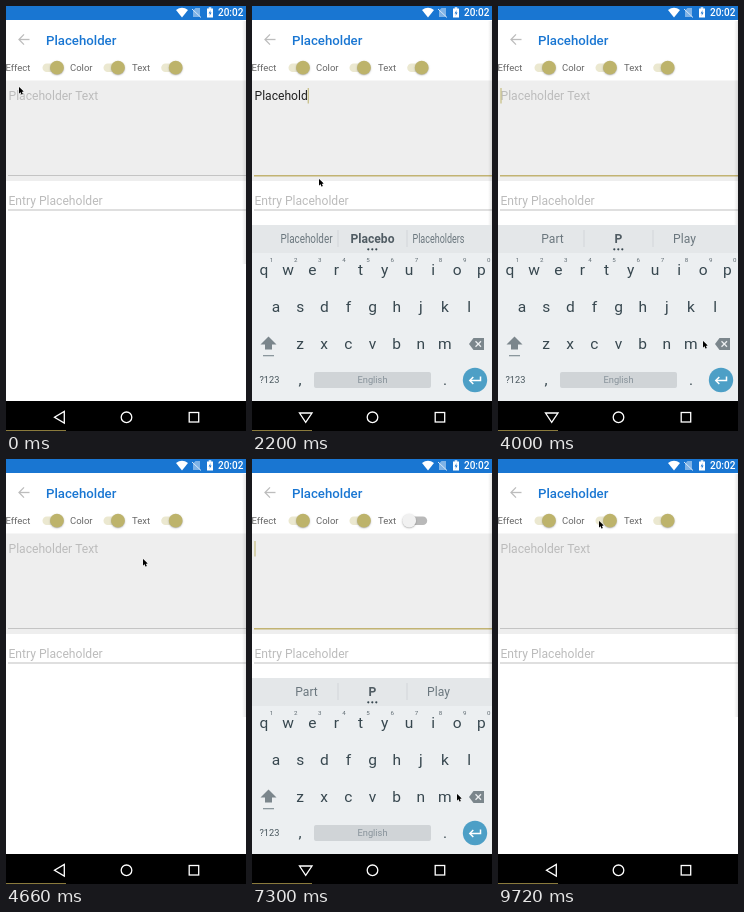
Recreate the animation shown at these times as an HTML page with a canvas. Size 240 by 425 pixels, loop 9.74 s.

```html
<!DOCTYPE html>
<html lang="en">
<head>
<meta charset="utf-8">
<title>Placeholder demo</title>
<style>
html, body { margin: 0; width: 100%; height: 100%; overflow: hidden; background: #fff; }
canvas { display: block; width: 240px; height: 425px; }
</style>
</head>
<body>
<canvas id="stage"></canvas>
<script>
const LOOP = 9740, W = 240, H = 425;
const canvas = document.getElementById('stage');
const ctx = canvas.getContext('2d');
const dpr = window.devicePixelRatio || 1;
canvas.width = W * dpr;
canvas.height = H * dpr;

const BLUE = '#1976d2', KHAKI = '#bdb36b', HINT = '#bcbcbc', HINT_DARK = '#808080';
const WORD = 'Placeholder';

// Typing sessions: letters appear one by one, then get deleted one by one.
const sessions = [
  { open: 480, close: 4380, type: 1200, length: 11, erase: 3250 },
  { open: 5430, close: 8000, type: 5900, length: 6, erase: 7000, underline: true }
];
const TYPE_STEP = 115, ERASE_STEP = 60;

// Pointer path: time, x, y of the tip.
const path = [
  [0, 13, 81], [160, 13, 81], [400, 62, 112], [700, 62, 112], [1000, 67, 173],
  [2800, 67, 173], [3180, 205, 335], [4080, 205, 335], [4360, 180, 215],
  [4660, 137, 100], [4920, 160, 62], [5120, 160, 62], [5380, 66, 91],
  [6550, 66, 91], [6920, 205, 335], [7450, 205, 335], [7940, 154, 62],
  [8550, 154, 62], [8850, 101, 62], [9740, 101, 62]
];

const clamp = v => Math.max(0, Math.min(1, v));
const smooth = v => { v = clamp(v); return v * v * (3 - 2 * v); };
const ramp = (t, start, duration) => smooth((t - start) / duration);

function rect(x, y, w, h, color) {
  ctx.fillStyle = color;
  ctx.fillRect(x, y, w, h);
}

function round(x, y, w, h, r, color) {
  ctx.fillStyle = color;
  ctx.beginPath();
  ctx.roundRect(x, y, w, h, r);
  ctx.fill();
}

function disc(x, y, r, color) {
  ctx.fillStyle = color;
  ctx.beginPath();
  ctx.arc(x, y, r, 0, Math.PI * 2);
  ctx.fill();
}

function poly(points, { fill, stroke, width = 1, closed = true }) {
  ctx.beginPath();
  points.forEach(([x, y]) => ctx.lineTo(x, y));
  if (closed) ctx.closePath();
  if (fill) { ctx.fillStyle = fill; ctx.fill(); }
  if (stroke) { ctx.strokeStyle = stroke; ctx.lineWidth = width; ctx.stroke(); }
}

function text(str, x, y, size, color, { weight = 400, align = 'left', max } = {}) {
  ctx.font = `${weight} ${size}px Roboto, sans-serif`;
  ctx.textAlign = align;
  ctx.fillStyle = color;
  ctx.fillText(str, x, y, max);
}

function typedCount(t, s) {
  if (t < s.type) return 0;
  const added = Math.min(s.length, Math.floor((t - s.type) / TYPE_STEP) + 1);
  const removed = t < s.erase ? 0 : Math.floor((t - s.erase) / ERASE_STEP) + 1;
  return Math.max(0, added - removed);
}

function suggestions(n, erasing) {
  if (n === 0 || (n === 1 && erasing)) return ['Part', 'P', 'Play'];
  if (n === 1) return ['Play', 'Part', 'Post'];
  if (n < 4) return ['Play', 'Place', 'Please'];
  if (n < 6) return ['Places', 'Place', 'Placed'];
  return ['Placeholder', n < 11 ? 'Placebo' : 'Placeholder', 'Placeholders'];
}

function statusBar() {
  rect(0, 0, W, 14, BLUE);
  ctx.fillStyle = '#fff';
  ctx.beginPath();
  ctx.moveTo(176, 11.5);
  ctx.lineTo(170, 4);
  ctx.quadraticCurveTo(176, -0.5, 182, 4);
  ctx.fill();
  poly([[187, 4.5], [189.5, 2], [194, 2], [194, 11], [187, 11]], { fill: '#7fb3e6' });
  poly([[186, 3], [195, 11.5]], { stroke: '#d6e7f8', closed: false });
  rect(201, 2.5, 6, 9, '#fff');
  rect(202.7, 1.3, 2.6, 1.5, '#fff');
  poly([[204.6, 4], [202.6, 7.5], [204, 7.5], [203.5, 10], [205.6, 6.5], [204.2, 6.5]], { fill: BLUE });
  text('20:02', 212, 10.2, 10, '#fff', { weight: 500 });
}

function header() {
  poly([[23.5, 33.5], [13, 33.5]], { stroke: '#bdbdbd', width: 1.3, closed: false });
  poly([[18, 28.4], [13, 33.5], [18, 38.6]], { stroke: '#bdbdbd', width: 1.3, closed: false });
  text('Placeholder', 40, 38.5, 13.2, BLUE, { weight: 500 });
}

function toggle(label, x, thumb, on, ripple) {
  text(label, x, 65.3, 9.5, '#666');
  const cx = thumb - 12.5 * (1 - on);
  round(thumb - 14.5, 57.5, 20, 8.5, 4.25, on > 0.5 ? '#ebe8d0' : '#b9b9b9');
  if (ripple > 0) disc(cx, 62, 11, `rgba(150,150,130,${0.16 * ripple})`);
  ctx.save();
  ctx.shadowColor = 'rgba(0,0,0,.3)';
  ctx.shadowBlur = 1.6 * dpr;
  ctx.shadowOffsetY = 0.7 * dpr;
  disc(cx, 61.7, 6.9, on > 0.5 ? KHAKI : '#f1f1f1');
  ctx.restore();
}

const bump = (t, at) => t < at - 60 || t > at + 200 ? 0 : Math.sin(Math.PI * (t - at + 60) / 260);

function toggles(t) {
  const colorOn = 1 - ramp(t, 8950, 80) + ramp(t, 9330, 80);
  const textOn = 1 - ramp(t, 5060, 80) + ramp(t, 8090, 80);
  toggle('Effect', -0.5, 51, 1, 0);
  toggle('Color', 64, 112, colorOn, bump(t, 8950) + bump(t, 9330));
  toggle('Text', 126, 169.7, textOn, bump(t, 5060) + bump(t, 8090));
}

function fields(t, session, count) {
  const hint = t >= 8960 && t < 9340 ? HINT_DARK : HINT;
  const hasHint = t < 5070 || t >= 8100;
  const focused = !!session && t < session.close;
  rect(0, 74.5, W, 100.5, '#eeeeee');
  if (focused) rect(2, 169, 238, 1.5, '#c2b372');
  else rect(2, 169, 238, 1, '#c4c4c4');
  if (count) {
    const value = WORD.slice(0, count);
    text(value, 2.5, 94, 12.1, '#212121');
    if (session.underline) rect(3, 95.7, ctx.measureText(value).width, 1, '#444');
  } else if (hasHint) {
    text('Placeholder Text', 2.5, 94, 12.1, hint);
  }
  if (focused) {
    const end = session.erase + session.length * ERASE_STEP;
    const typed = session.type + session.length * TYPE_STEP;
    const lastEdit = t > end ? end : t > session.erase ? t : t > typed ? typed : t >= session.type ? t : session.open;
    ctx.font = '400 12.1px Roboto, sans-serif';
    const x = 2.5 + ctx.measureText(WORD.slice(0, count)).width;
    if ((t - lastEdit) % 1000 < 500) rect(x, 82, 1, 15.5, KHAKI);
  }
  text('Entry Placeholder', 2.5, 199, 12.1, hint);
  rect(2, 203.5, 238, 1, '#c0c0c0');
  const edge = ctx.createLinearGradient(236, 0, 240, 0);
  edge.addColorStop(0, 'rgba(0,0,0,0)');
  edge.addColorStop(1, 'rgba(0,0,0,.1)');
  rect(236, 15, 4, 243, edge);
}

function keyRow(keys, x, y) {
  [...keys].forEach((k, i) => text(k, x + 24.15 * i, y, 15.5, '#37474f', { align: 'center' }));
}

function keyboard(words) {
  const gray = '#5f6b72';
  rect(0, 219, W, 176, '#eceff1');
  rect(0, 219, W, 28, '#e4e7e9');
  [85.5, 154.5].forEach(x => rect(x, 224, 1, 17, '#d2d6d9'));
  words.forEach((word, i) => text(word, 54.5 + 66 * i, 237.3, 12.1, i === 1 ? '#505c63' : '#6b777e',
    { weight: i === 1 ? 700 : 400, align: 'center', max: 52 }));
  [-4, 0, 4].forEach(dx => disc(120.3 + dx, 243.3, 1.1, '#37474f'));

  keyRow('qwertyuiop', 12, 269);
  [...'1234567890'].forEach((d, i) => text(d, 19.5 + 24.15 * i, 256, 6.2, gray, { align: 'center' }));
  keyRow('asdfghjkl', 24, 305.5);
  keyRow('zxcvbnm', 48, 342.5);

  poly([[16.5, 330.5], [24.5, 338.5], [20, 338.5], [20, 343.5], [13, 343.5], [13, 338.5], [8.5, 338.5]], { fill: '#7b868c' });
  rect(11, 349, 11, 1.3, '#8b979d');
  poly([[217, 338], [221.5, 332], [232, 332], [232, 344], [221.5, 344]], { fill: '#7b868c' });
  poly([[223.5, 335.3], [229, 340.7]], { stroke: '#eceff1', width: 1.3, closed: false });
  poly([[229, 335.3], [223.5, 340.7]], { stroke: '#eceff1', width: 1.3, closed: false });

  text('?123', 7.5, 377.3, 9.2, '#46545b');
  text(',', 48, 378.5, 15.5, '#37474f', { align: 'center' });
  round(62, 366, 117, 16, 2, '#d0d4d7');
  text('English', 120.5, 377.3, 9.3, '#87929a', { align: 'center' });
  text('.', 193, 378.5, 15.5, '#37474f', { align: 'center' });
  disc(223, 374, 12.2, '#4d9fc6');
  poly([[228.5, 370.5], [228.5, 374.5], [218, 374.5]], { stroke: '#fff', width: 1.5, closed: false });
  poly([[221.3, 371], [217.8, 374.5], [221.3, 378]], { stroke: '#fff', width: 1.5, closed: false });
}

function navIcons(open) {
  const line = { stroke: '#fff', width: 1.3 };
  if (open) poly([[47.5, 407], [60, 407], [53.7, 416.3]], line);
  else poly([[58.3, 405.5], [58.3, 417], [48.5, 411.2]], line);
  ctx.beginPath();
  ctx.arc(120.5, 411.3, 5.3, 0, Math.PI * 2);
  ctx.stroke();
  ctx.strokeRect(183.2, 406.5, 9.5, 9.5);
  rect(0, 424, 60, 1, '#8a7a3c');
}

function pointer(t) {
  const i = Math.max(1, path.findIndex(p => p[0] >= t));
  const [t0, x0, y0] = path[i - 1], [t1, x1, y1] = path[i];
  const k = smooth((t - t0) / (t1 - t0));
  const x = x0 + (x1 - x0) * k, y = y0 + (y1 - y0) * k;
  const arrow = [[0, 0], [0, 6.4], [1.5, 5.1], [2.6, 7.6], [3.7, 7.1], [2.7, 4.7], [4.6, 4.6]];
  poly(arrow.map(([dx, dy]) => [x + dx, y + dy]), { fill: '#000', stroke: 'rgba(255,255,255,.6)', width: 0.7 });
  poly(arrow.map(([dx, dy]) => [x + dx, y + dy]), { fill: '#000' });
}

function draw(t) {
  const session = sessions.find(s => t >= s.open && t < s.close + 165);
  const count = session ? typedCount(t, session) : 0;
  ctx.setTransform(dpr, 0, 0, dpr, 0, 0);
  rect(0, 0, W, H, '#fff');
  statusBar();
  header();
  fields(t, session, count);
  toggles(t);
  rect(0, 395, W, 30, '#000');
  if (session) {
    const shown = clamp((t - session.open) / 165) * (1 - clamp((t - session.close) / 165));
    ctx.save();
    ctx.globalAlpha = shown;
    ctx.translate(0, 34 * (1 - shown));
    keyboard(suggestions(count, t >= session.erase));
    ctx.restore();
  }
  navIcons(session && t < session.close);
  pointer(t);
}

const start = performance.now();
function tick() {
  draw((performance.now() - start) % LOOP);
  requestAnimationFrame(tick);
}
tick();
</script>
</body>
</html>
```
